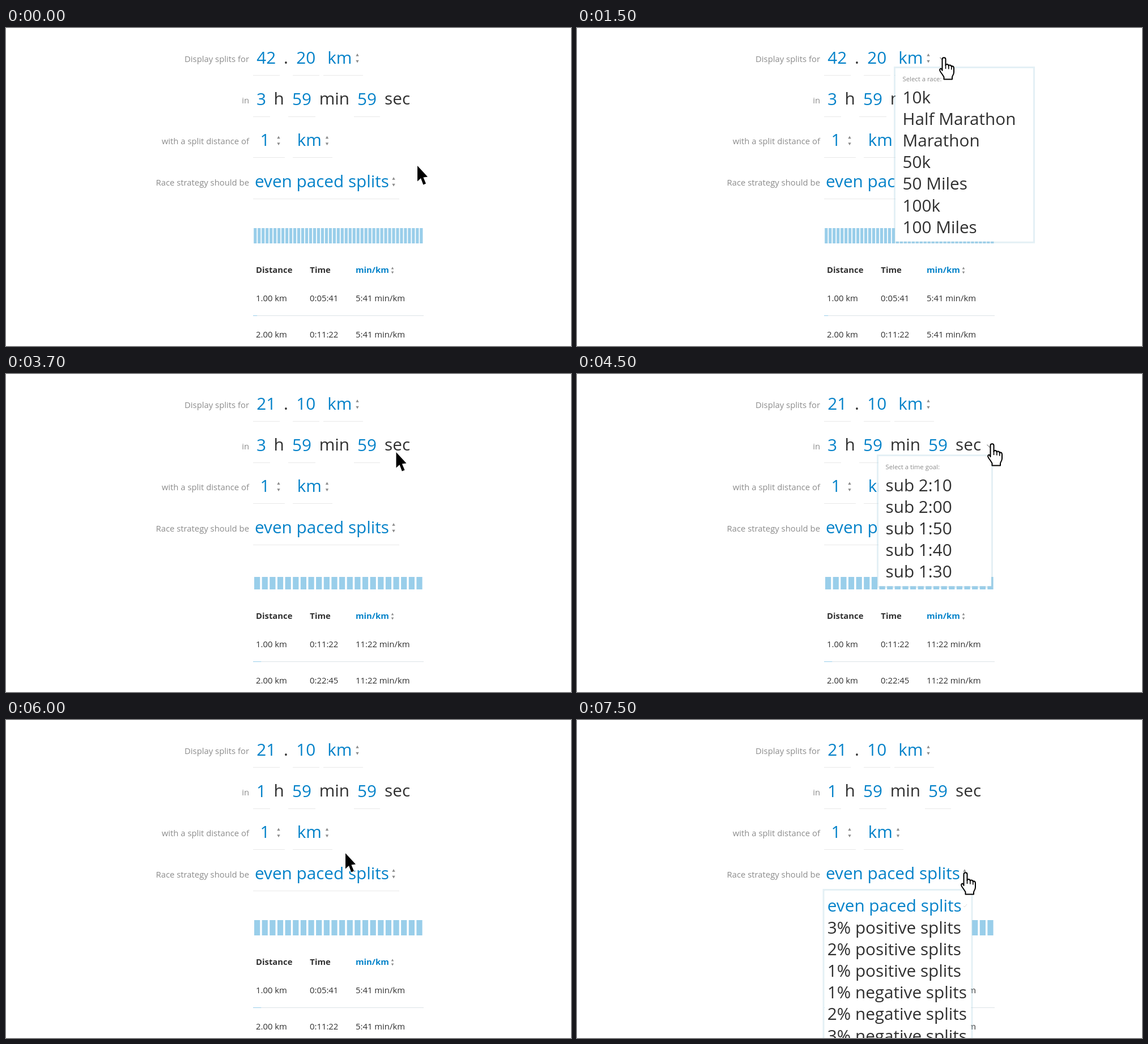
An HTML page with a canvas that plays this animation: 997x561 px, repeating every 8000 ms.

```html
<!DOCTYPE html>
<html lang="en">
<head>
<meta charset="utf-8">
<title>Race splits</title>
<style>
html, body { margin: 0; width: 100%; height: 100%; overflow: hidden; background: #fff; }
canvas { display: block; }
</style>
</head>
<body>
<canvas width="997" height="561"></canvas>
<script>
const ctx = document.querySelector('canvas').getContext('2d');
const LOOP = 8000, BIG = 29.7, SMALL = 14.85, LINE = 38.2;
const BLUE = '#0482c9', DARK = '#303030', GREY = '#8c8c8c', PALE = '#99ceea';

const arrow = new Path2D('M0 0V27.5L6 22L10.3 33.5L15 31.5L10.4 20.4L18 19.6Z');
const hand = new Path2D('M5.5 24V4.2a3 3 0 0 1 6 0V15q0-2 2.5-2t2.8 3q0-2 2.5-1.5t2.5 3q.5-1.5 2.3-1t1.9 3.5v7q0 3-2 6l-1 2.5v4H8.5v-4Q6 31 2.5 26.5 0 22.5 2 21t3.5 3z');
const knuckles = new Path2D('M11.5 14v7M16.8 16v5.5M21.8 17.5v5');

const start = [727, 242];
const moves = [[500, 647, 51], [2000, 647, 152], [3500, 732, 122], [5000, 600, 234], [6500, 685, 268]];

const menus = [
  { from: 1500, to: 3000, x: 559, y: 68, w: 249, title: 'Select a race:',
    items: ['10k', 'Half Marathon', 'Marathon', '50k', '50 Miles', '100k', '100 Miles'] },
  { from: 4500, to: 6000, x: 529, y: 142, w: 205, title: 'Select a time goal:',
    items: ['sub 2:10', 'sub 2:00', 'sub 1:50', 'sub 1:40', 'sub 1:30'] },
  { from: 7500, to: LOOP, x: 433.5, y: 298, w: 265, picked: 0,
    items: ['even paced splits', ...['3% positive', '2% positive', '1% positive',
      '1% negative', '2% negative', '3% negative'].map(s => s + ' splits')] }
];

function text(str, x, y, color = DARK, align = 'left', size = BIG, weight = 400) {
  ctx.font = `${weight} ${size}px "Open Sans", sans-serif`;
  ctx.textAlign = align;
  ctx.fillStyle = color;
  ctx.fillText(str, x, y);
}

function rect(x, y, w, h, color) {
  ctx.fillStyle = color;
  ctx.fillRect(x, y, w, h);
}

function line(color, width, ...pts) {
  ctx.beginPath();
  for (let i = 0; i < pts.length; i += 2) ctx.lineTo(pts[i], pts[i + 1]);
  ctx.strokeStyle = color;
  ctx.lineWidth = width;
  ctx.stroke();
}

function stepper(x, y, gap = 3.5, r = 2.7) {
  ctx.fillStyle = GREY;
  for (const s of [-1, 1]) {
    ctx.beginPath();
    ctx.moveTo(x - r, y + s * gap);
    ctx.lineTo(x + r, y + s * gap);
    ctx.lineTo(x, y + s * (gap + r * 1.75));
    ctx.fill();
  }
}

// A value centred above its underline
function field(str, x, y, left, right) {
  text(str, x, y, BLUE, 'center');
  rect(left, y + 20, right - left, 1, '#e9e9e9');
}

function form(half, fast) {
  ['Display splits for', 'in', 'with a split distance of', 'Race strategy should be']
    .forEach((s, i) => text(s, 429, 60 + i * 72.6, GREY, 'right', SMALL));
  field(half ? '21' : '42', 459.3, 63, 436, 483);
  text('.', 494, 63, DARK, 'center');
  field(half ? '10' : '20', 529.3, 63, 506, 553);
  field('km', 588.8, 63, 560, 630);
  stepper(620, 53.3);

  field(fast ? '1' : '3', 450.5, 136, 436, 466);
  text('h', 481.5, 135, DARK, 'center');
  field('59', 522, 136, 498, 546);
  text('min', 579.3, 135, DARK, 'center');
  field('59', 637, 136, 614, 660);
  text('sec', 690.6, 135, DARK, 'center');

  field('1', 457, 208, 436, 492);
  stepper(481, 198.8);
  field('km', 535.3, 208, 506, 576);
  stepper(566.5, 198.8);

  text('even paced splits', 439, 280.6, BLUE);
  rect(436, 301, 258, 1, '#e9e9e9');
  stepper(684, 271.3);
}

function results(half, fast) {
  const count = half ? 22 : 43, pitch = 300 / count, top = half && !fast ? 358 : 353;
  for (let i = 0; i < count; i++)
    rect(436.3 + (i + .125) * pitch, top, pitch * .75, 380 - top, PALE);

  const cell = (str, x, y, color, weight) => text(str, x, y, color, 'left', SMALL, weight);
  cell('Distance', 441, 432.3, DARK, 700);
  cell('Time', 536.3, 432.3, DARK, 700);
  cell('min/km', 617, 432.3, BLUE, 700);
  stepper(682, 427.5, 2, 2.3);

  const slow = half && !fast;
  const times = slow ? ['0:11:22', '0:22:45'] : ['0:05:41', '0:11:22'];
  times.forEach((time, i) => {
    const y = 481.5 + i * 64;
    cell(`${i + 1}.00 km`, 441, y);
    cell(time, 536, y);
    cell((slow ? '11:22' : '5:41') + ' min/km', 617, y);
  });
  rect(436, 507, 301, 1, '#dce3e7');
  rect(436, 507, 300 / (half ? 21.1 : 42.2), 1, PALE);
}

function menu({ x, y, w, title, items, picked }, tipY) {
  const h = items.length * LINE + (title ? 44.3 : 20);
  const first = y + (title ? 64.6 : 40.3);
  rect(x + 3, y + 3, w - 6, h - 6, '#fff');
  ctx.strokeStyle = 'rgba(165,205,222,.3)';
  ctx.lineWidth = 3;
  ctx.strokeRect(x + 1.5, y + 1.5, w - 3, h - 3);
  const left = x + (title ? 15.5 : 8.3);
  if (title) text(title, left, y + 26, GREY, 'left', 11.35);
  else line('#dedede', 1, 682, 328, 684, 330, 688, 325);
  const active = picked ?? Math.floor((tipY - first + 29) / LINE);
  items.forEach((s, i) => text(s, left, first + i * LINE, i === active ? BLUE : DARK));
}

function pointerAt(t) {
  let [x, y] = start;
  for (const [t0, tx, ty] of moves) {
    const k = Math.max(0, Math.min(6, Math.floor((t - t0) / 100) + 1)) / 6;
    x += (tx - x) * k;
    y += (ty - y) * k;
  }
  return [x, y];
}

function pointer(x, y, isHand) {
  ctx.save();
  ctx.lineJoin = 'round';
  if (isHand) {
    ctx.translate(x - 8, y);
    ctx.fillStyle = '#fff';
    ctx.strokeStyle = '#000';
    ctx.lineWidth = 2;
    ctx.fill(hand);
    ctx.stroke(hand);
    ctx.lineWidth = 1.6;
    ctx.stroke(knuckles);
  } else {
    ctx.translate(x - 1, y + 1);
    ctx.strokeStyle = '#fff';
    ctx.lineWidth = 2;
    ctx.stroke(arrow);
    ctx.fillStyle = '#000';
    ctx.fill(arrow);
  }
  ctx.restore();
}

function draw(now) {
  const t = now % LOOP, within = (a, b) => t >= a && t < b;
  const half = t >= 3000, fast = t >= 6000;
  const [x, y] = pointerAt(t);
  const onRace = within(1000, 3000), onTime = within(4000, 6000);

  rect(0, 0, 997, 561, '#fff');
  form(half, fast);
  results(half, fast);
  if (onRace) line(GREY, 1.2, 640.5, 52, 645, 56.5, 649.5, 52);
  if (onTime) line(GREY, 1.2, 723.5, 124.7, 728, 129.2, 732.5, 124.7);
  for (const m of menus) if (within(m.from, m.to)) menu(m, y);
  pointer(x, y, onRace || onTime || t >= 7000);
  requestAnimationFrame(draw);
}
requestAnimationFrame(draw);
</script>
</body>
</html>
```
